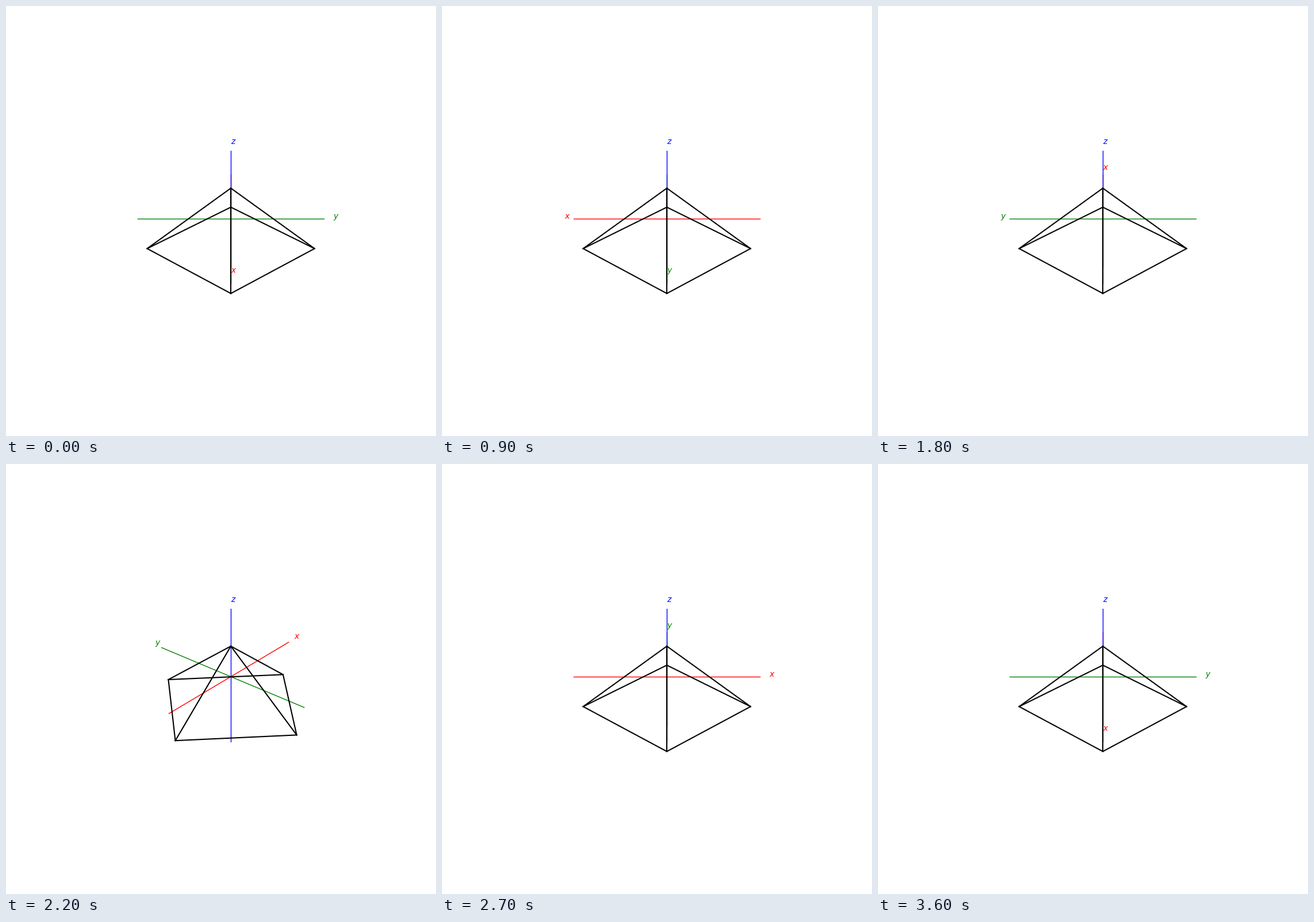
Write a matplotlib script that moves like this. It is 748 by 748 pixels and loops after 3700 ms.

```python
import numpy as np
import matplotlib.pyplot as plt
from matplotlib.animation import FuncAnimation

SIZE, DPI = 748, 100
FRAMES, STEP = 37, 10          # degrees of azimuth per frame
ELEV = np.radians(30)
DIST = 10                      # eye distance in box units

# Square plot area inside the figure and the position of the origin in it
SIDE = 0.77 * SIZE
CX = 0.5125 * SIZE - SIDE / 2 + SIDE * 0.095 / 0.185
CY = 0.11 * SIZE + SIDE * 0.095 / 0.185
FOCAL = SIDE / 0.185

# Box of proportions 4:4:3, spanning +-1.21 in x and y, +-1.1 in z
BOX = 1.8294640721620434 * np.array([4, 4, 3]) / np.sqrt(41)
SCALE = BOX / np.array([2.42, 2.42, 2.2])

AXIS, LABEL = 1.1, 1.21


def project(point, azim):
    """Perspective view of a 3D point, in pixels from the lower left."""
    x, y, z = np.asarray(point) * SCALE
    side = y * np.cos(azim) - x * np.sin(azim)
    front = x * np.cos(azim) + y * np.sin(azim)
    up = z * np.cos(ELEV) - front * np.sin(ELEV)
    depth = DIST - front * np.cos(ELEV) - z * np.sin(ELEV)
    return CX + FOCAL * side / depth, CY + FOCAL * up / depth


fig = plt.figure(figsize=(SIZE / DPI, SIZE / DPI), dpi=DPI, facecolor="white")
ax = fig.add_axes([0, 0, 1, 1])
ax.set(xlim=(0, SIZE), ylim=(0, SIZE))
ax.axis("off")

segments, labels = [], []


def add_segment(a, b, color, width):
    line, = ax.plot([], [], color=color, lw=width)
    segments.append((line, a, b))


for unit, name, color in zip(np.eye(3), "xyz", "rgb"):
    add_segment(-AXIS * unit, AXIS * unit, color, 1)
    text = ax.text(0, 0, f"${name}$", color=color, fontsize=10)
    labels.append((text, LABEL * unit))

apex = (0, 0, 0.5)
base = [(1, 0, -0.5), (0, 1, -0.5), (-1, 0, -0.5), (0, -1, -0.5)]
for i, corner in enumerate(base):
    add_segment(corner, base[(i + 1) % 4], "k", 1.5)
for corner in base:
    add_segment(corner, apex, "k", 1.5)


def update(i):
    azim = np.radians(STEP * i)
    for line, a, b in segments:
        line.set_data(*zip(project(a, azim), project(b, azim)))
    for text, point in labels:
        text.set_position(project(point, azim))
    return [item[0] for item in segments + labels]


anim = FuncAnimation(fig, update, frames=FRAMES, interval=100,
                     repeat=True, repeat_delay=0)
plt.show()
```
